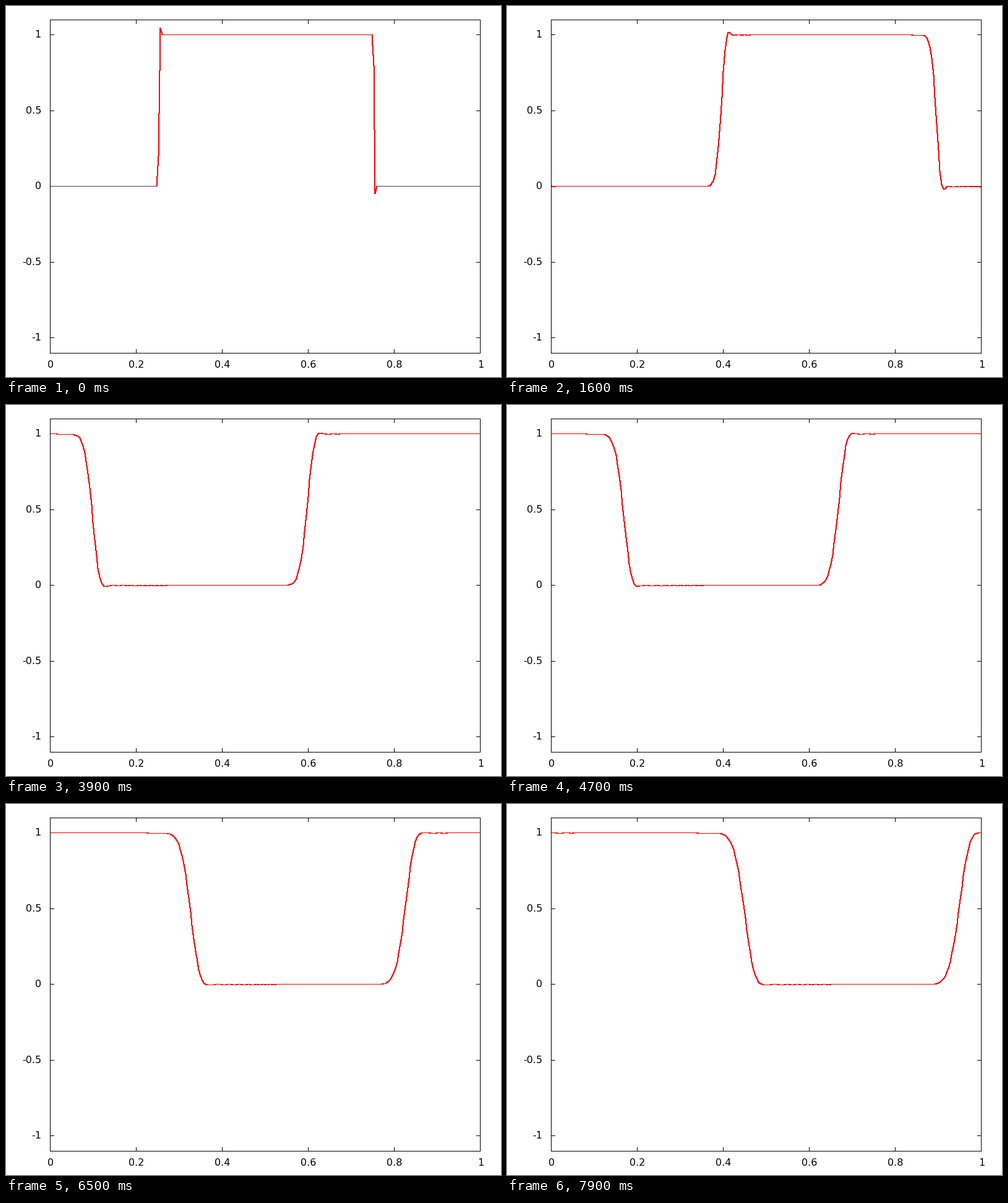
Animation, 800 px wide and 600 px high, one loop 8000 ms. Source, as a matplotlib script:

```python
import numpy as np
import matplotlib.pyplot as plt
from matplotlib.animation import FuncAnimation

W, H, DPI = 800, 600, 100
LEFT, RIGHT, TOP, BOTTOM = 71, 766, 22, 561
FRAMES, INTERVAL = 80, 100
CELLS, CFL, STEPS = 256, 0.75, 3
CALM_FRAMES = 15  # until the ripples wrap round, the untouched baseline is dark
PX = 72 / DPI

plt.rcParams["path.simplify"] = False
plt.rcParams["font.family"] = "DejaVu Sans"


def col(x):
    return np.floor(LEFT + 0.5 + np.asarray(x) * (RIGHT - LEFT))


def row(u):
    scale = (BOTTOM - TOP) / 2.2
    up = np.floor(H - 1 - BOTTOM + 0.5 + (np.asarray(u) + 1.1) * scale + 1e-12)
    return H - 1 - up


def solve():
    """Advect a square pulse with a half-weighted upwind slope correction."""
    a = CFL * (1 - CFL) / 4
    c0, c1, c2 = 1 - CFL - a, CFL + 2 * a, -a
    u = np.where(np.abs(centres - 0.5) < 0.25, 1.0, 0.0)
    states = []
    for step in range(STEPS * (FRAMES - 1) + 1):
        u = c0 * u + c1 * np.roll(u, 1) + c2 * np.roll(u, 2)
        if step % STEPS == 0:
            states.append([float(f"{v:.6g}") for v in u])
    return np.array(states)


centres = (np.arange(CELLS) + 0.5) / CELLS
cols = col(centres)
rows = np.maximum(row(solve()), TOP)
base = row(0.0)

fig = plt.figure(figsize=(W / DPI, H / DPI), dpi=DPI, facecolor="white")
ax = fig.add_axes([0, 0, 1, 1])
ax.set(xlim=(0, W), ylim=(H, 0))
ax.axis("off")


def stroke(xs, ys, color="black", z=1):
    """Hard-edged one-pixel line through pixel centres."""
    line, = ax.plot(np.asarray(xs) + 0.5, np.asarray(ys) + 0.5, color=color,
                    lw=PX, antialiased=False, snap=False, zorder=z,
                    solid_joinstyle="miter")
    return line


def label(x, y, text, ha):
    ax.text(x, y, text, ha=ha, va="baseline", fontsize=16 * PX, color="black")


for x in np.arange(6) / 5:
    c = col(x)
    stroke([c, c], [BOTTOM, BOTTOM - 6])
    stroke([c, c], [TOP, TOP + 6])
    label(c + 1, 585, f"{x:g}", "center")

for u in np.arange(-2, 3) / 2:
    r = row(u)
    stroke([LEFT, LEFT + 6], [r, r])
    stroke([RIGHT, RIGHT - 6], [r, r])
    label(57, r + 5, f"{u:g}", "right")

stroke([LEFT, RIGHT, RIGHT, LEFT, LEFT],
       [TOP, TOP, BOTTOM, BOTTOM, TOP], z=5)

curve = stroke(cols, rows[0], "#ff0000", 3)
calm = [stroke([], [], "#444444", 4) for _ in range(2)]


def update(i):
    curve.set_ydata(rows[i] + 0.5)
    touched = np.flatnonzero(rows[i] != base)
    parts = cols[:CELLS // 4], cols[touched[-1] + 1:]
    for line, xs in zip(calm, parts):
        xs = xs if i < CALM_FRAMES else xs[:0]
        line.set_data(xs + 0.5, np.full(len(xs), base + 0.5))
    return [curve, *calm]


anim = FuncAnimation(fig, update, frames=FRAMES, interval=INTERVAL,
                     repeat=True, repeat_delay=0, blit=False)
plt.show()
```
